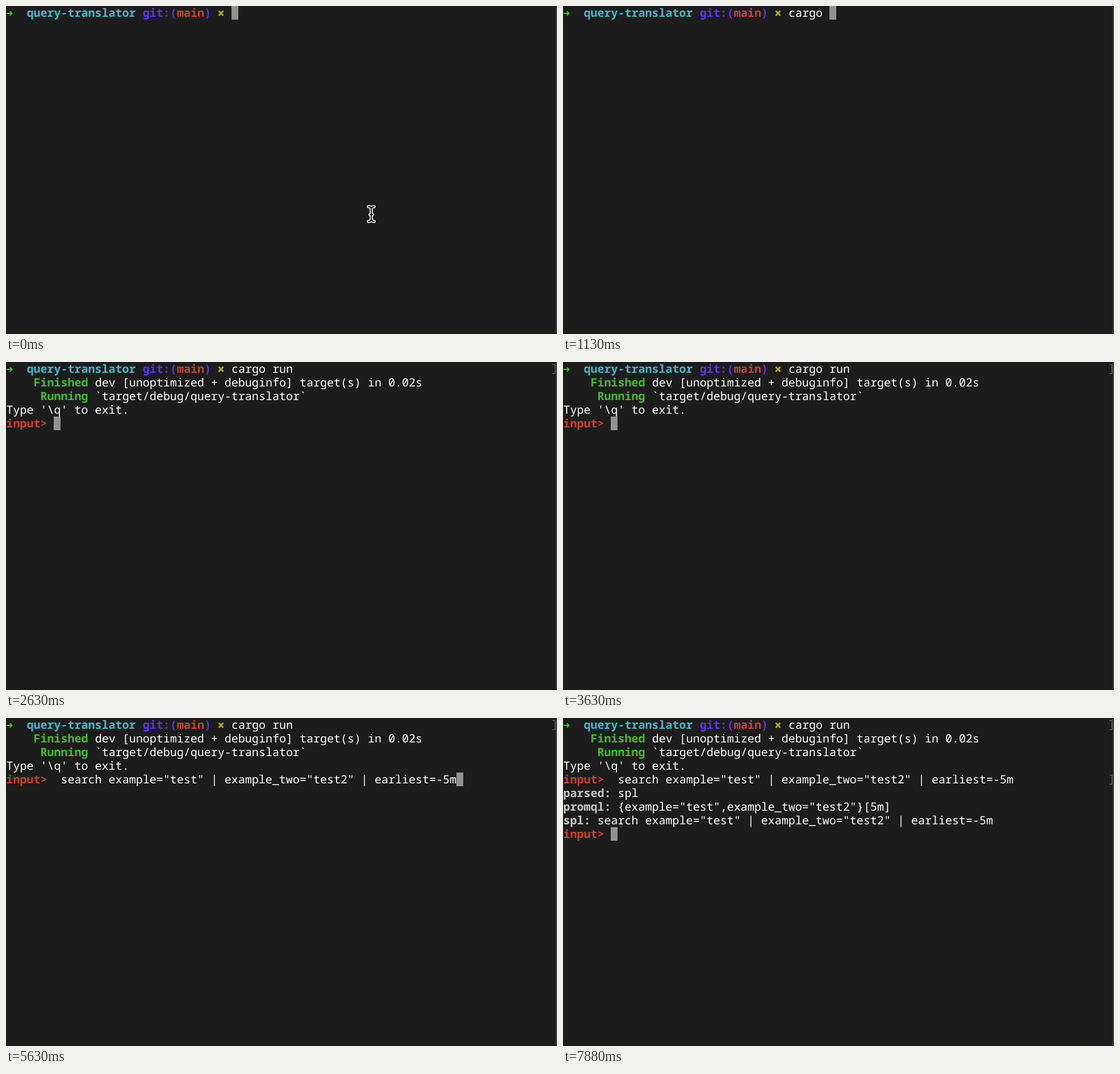
These frames come from a looping animation (970 px wide and 577 px high, 8000 ms). An HTML page:

```html
<!DOCTYPE html>
<html lang="en">
<head>
<meta charset="utf-8">
<title>Terminal session</title>
<style>
html, body { margin: 0; width: 100%; height: 100%; overflow: hidden; background: #1c1c1c; }
svg { display: block; }
text {
  font: 500 20.03px "Noto Sans Mono", "DejaVu Sans Mono", monospace;
  white-space: pre;
  text-rendering: geometricPrecision;
  font-variant-ligatures: none;
}
.bold { font-weight: 700; }
</style>
</head>
<body>
<svg width="970" height="577" viewBox="0 0 970 577">
  <rect width="970" height="577" fill="#1c1c1c"/>
  <rect x="968" width="2" height="577" fill="#444"/>
  <rect y="576" width="970" height="1" fill="#241619"/>
  <path d="M1 13H10M7 9.5L10.5 13L7 16.5" fill="none" stroke="#3fc02d" stroke-width="2.2"/>
  <path d="M374.5 8.5L382.5 17M382.5 8.5L374.5 17" stroke="#b1ad2b" stroke-width="2.8"/>
  <g id="screen"></g>
  <rect id="caret" width="12" height="24" fill="#929292"/>
  <g id="beam" fill="none" stroke-linecap="round">
    <path id="outline" stroke="#fff" stroke-width="5.4"
      d="M638 353Q643 353 643 357V375Q643 379 638 379M648 353Q643 353 643 357M643 375Q643 379 648 379M641 367H645"/>
    <use href="#inner"/>
    <path id="inner" stroke="#1c1c1c" stroke-width="2"
      d="M638 353Q643 353 643 357V375Q643 379 638 379M648 353Q643 353 643 357M643 375Q643 379 648 379M641 367H645"/>
  </g>
</svg>
<script>
const LOOP = 8000, CELL = 12.02, ROW = 24;
const WHITE = "#fff", GREEN = "#3fc02d", CYAN = "#3dbdca", BLUE = "#5b35f2",
      RED = "#cb422a", GRAY = "#c8c8c8";
const QUERY = 'search example="test" | example_two="test2" | earliest=-5m';

const START = 5000, RESULT = 7000, OUTPUT = 2380;
// Command line contents and the time each one appears
const TYPED = [
  [0, ""], [130, "c"], [380, "ca"], [500, "car"], [750, "cargo"], [1000, "cargo "],
  [1250, "cargo r"], [1380, "cargo ru"], [1500, "cargo run"], [1630, "cargo runn"],
  [2000, "cargo run"]
];

const screen = document.getElementById("screen");
const caret = document.getElementById("caret");
const beam = document.getElementById("beam");
let shown = "";

const escape = s => s.replace(/&/g, "&amp;").replace(/</g, "&lt;").replace(/>/g, "&gt;");

// A part is [column, colour, text]; everything but white is bold.
const part = (row, [col, color, text]) =>
  `<text x="${(col * CELL + 0.4).toFixed(2)}" y="${row * ROW + 19}" fill="${color}"` +
  `${color === WHITE ? "" : ' class="bold"'}>${escape(text)}</text>`;

const bracket = row =>
  `<path d="M962 ${row * ROW + 4.5}H966.5V${row * ROW + 20.5}H962" fill="none" stroke="#858585"/>`;

function frame(t) {
  const command = TYPED.filter(step => step[0] <= t).pop()[1];
  const rows = [[
    [3, CYAN, "query-translator"], [20, BLUE, "git:("], [25, RED, "main"],
    [29, BLUE, ")"], [33, WHITE, command]
  ]];
  let caretCol = 33 + command.length, marks = [];

  if (t >= OUTPUT) {
    rows.push(
      [[4, GREEN, "Finished"], [13, WHITE, "dev [unoptimized + debuginfo] target(s) in 0.02s"]],
      [[5, GREEN, "Running"], [13, WHITE, "`target/debug/query-translator`"]],
      [[0, WHITE, "Type '\\q' to exit."]],
      [[0, RED, "input>"]]
    );
    marks.push(0);
    caretCol = 7;
  }
  if (t >= START) {
    rows[4].push([8, WHITE, QUERY]);
    caretCol = 8 + QUERY.length;
  }
  if (t >= RESULT) {
    rows.push(
      [[0, GRAY, "parsed:"], [8, WHITE, "spl"]],
      [[0, GRAY, "promql:"], [8, WHITE, '{example="test",example_two="test2"}[5m]']],
      [[0, GRAY, "spl:"], [5, WHITE, QUERY]],
      [[0, RED, "input>"]]
    );
    marks.push(4);
    caretCol = 7;
  }

  const html = rows.map((parts, i) => parts.map(p => part(i, p)).join("")).join("") +
    marks.map(bracket).join("");
  if (html !== shown) screen.innerHTML = shown = html;
  caret.setAttribute("x", Math.round(caretCol * CELL));
  caret.setAttribute("y", (rows.length - 1) * ROW);
  beam.setAttribute("visibility", t < 130 ? "visible" : "hidden");
}

const begin = performance.now();
function tick() {
  frame((performance.now() - begin) % LOOP);
  requestAnimationFrame(tick);
}
tick();
</script>
</body>
</html>
```
